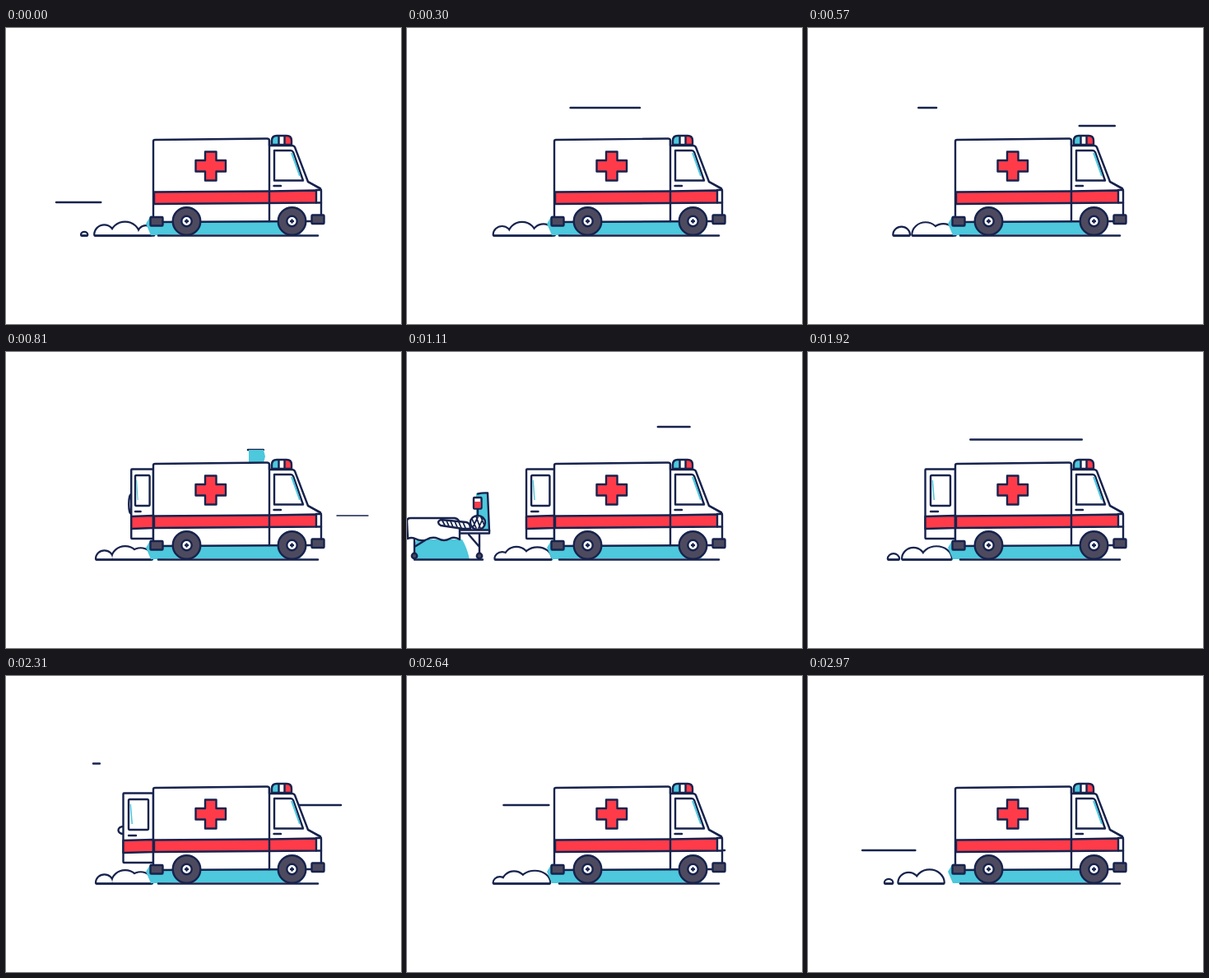
These frames come from a looping animation (480x360 px, 3000 ms). An HTML page:

```html
<!DOCTYPE html>
<html lang="en">
<head>
<meta charset="utf-8">
<title>Ambulance</title>
<style>
  html, body { margin: 0; width: 100%; height: 100%; overflow: hidden; background: #fff; }
  svg { display: block; width: 480px; height: 360px; }
  svg * { vector-effect: non-scaling-stroke; }
  .o { stroke: #17234d; stroke-width: 2.4; stroke-linecap: round; stroke-linejoin: round; }
  .w { fill: #fff; }
  .r { fill: #ff3b4a; }
  .c { fill: #4dc8dc; }
  .g { fill: #4d4a5f; }
  .n { fill: none; }
  .thin { stroke-width: 1.8; }
  .rim { stroke-width: 4.4; }
  #lines { stroke-width: 2.5; }
</style>
</head>
<body>
<svg viewBox="0 0 480 360">
  <defs>
    <clipPath id="behind"><rect width="177" height="360"/></clipPath>
    <g id="wheel">
      <circle class="o g" r="16.800"/>
      <circle class="o w" r="6.2"/>
      <path class="o" d="M-1.5 0H1.5M0-1.5V1.5"/>
    </g>
  </defs>

  <g id="lines" class="o n"></g>

  <g clip-path="url(#behind)">
    <g id="bed">
      <path class="c" d="M12 228H67Q73 238 76 252H13Q4 240 12 228ZM84 172H98L100 218H84Z"/>
      <path class="o n" d="M9 252.5H92M86 172.500Q92 171 98 171.5L100 218M86 191V201"/>
      <path class="o n" d="M9 228V245M88 222V245M75 222 88 237M22 229 9 237"/>
      <circle class="o g" cx="9" cy="248" r="3.2"/>
      <circle class="o g" cx="88" cy="248" r="3.2"/>
      <path class="o w" d="M62 216.500H100V220.500H62Z"/>
      <path class="o w" d="M0 206Q0 202 4 202H58Q64 203 64 210V228Q58 224 52 227 45 231 38 227 31 224 24 228 17 231 10 227 5 225 1 227Z"/>
      <ellipse class="o w" cx="86" cy="207.500" rx="9" ry="8.5"/>
      <path class="o n thin" d="M79 203 84 214M84 200 89 214M90 201 94 211M80 213 86 201M87 214 92 203"/>
      <path class="o w" d="M41 204 72 207Q77 208 77 215H68L41 211Q35 207 41 204Z"/>
      <path class="o n thin" d="M43 205 46 211M48 205 51 212M53 206 56 213M58 206 61 213M63 207 66 214M68 207 71 214"/>
      <rect class="o w" x="81" y="177" width="9.500" height="13.500" rx="1"/>
      <path class="r" d="M82 182H89.5V189.500H82Z"/>
    </g>
  </g>

  <g id="smoke"></g>

  <ellipse id="knob" class="o w"/>
  <g transform="translate(179 0)">
    <g id="door">
      <rect class="o w" x="-36.5" y="142.5" width="36.5" height="84.500" rx="1"/>
      <path class="o r" d="M-36.5 200 0 199V214L-36.5 215Z"/>
      <rect class="o w" x="-30" y="150" width="24" height="37" rx="1.5"/>
      <path class="c" d="M-28.500 156H-27L-25 180H-26.500Z"/>
      <path class="o n" d="M-30 194H-21"/>
    </g>
  </g>

  <path id="vent" class="c" d="M295 119H313L315 127 313 135H295Z"/>
  <path class="c" d="M176 228 170 238 176 252H185L210 251H358V235H190Z"/>
  <path class="o n" d="M185 252.5H379"/>
  <path class="o w" d="M179 138Q179 136 181 136L317 134.5Q320 134.5 320 137V143H347Q350 143 351 145L367 187 381 195Q383 196 383 198V228Q383 235 376 235L179 236Z"/>
  <path class="o r" d="M180 199.5 320 198.5 377 197.5V212.5L180 214Z"/>
  <path class="o n" d="M377 197H383M377 212.5H383M320 137V235M325.500 192H334M367 187 382 195"/>
  <path class="o w" d="M326 149H346Q348 149 349 151L361 185.5H326Z"/>
  <path class="c" d="M346 152H348.500L358 180H356Z"/>
  <path class="o r" d="M242 150.5H255.5V161H267V174.5H255.5V185.5H242V174.5H230.5V161H242Z"/>
  <path class="c" d="M323 142V137Q323 131 329 131H332V142Z"/>
  <path class="w" d="M331 131H340V142H331Z"/>
  <path class="r" d="M339 131H342Q347 131 347 137V142H339Z"/>
  <path class="o n" d="M323 142V137Q323 131 329 131H341Q347 131 347 137V142ZM331.5 131V142M338.5 131V142"/>
  <rect class="o g" x="175.500" y="230" width="15" height="10.500" rx="1"/>
  <rect class="o g" x="371.500" y="227.500" width="15" height="10.500" rx="1"/>
  <use href="#wheel" x="219.500" y="235"/>
  <use href="#wheel" x="347.500" y="235"/>
</svg>
<script>
const LOOP = 3000;
const NS = 'http://www.w3.org/2000/svg';
const $ = id => document.getElementById(id);
const clamp = u => Math.min(1, Math.max(0, u));
const mix = (a, b, u) => a + (b - a) * u;
const easeOut = u => 1 - (1 - clamp(u)) ** 2;

function add(parent, tag, cls) {
  const el = parent.appendChild(document.createElementNS(NS, tag));
  if (cls) el.setAttribute('class', cls);
  return el;
}
function set(el, attrs) {
  for (const k in attrs) el.setAttribute(k, attrs[k]);
}
// Linear interpolation through [position, value] pairs
function track(keys, x) {
  if (x <= keys[0][0]) return keys[0][1];
  for (let i = 1; i < keys.length; i++) {
    const [a, va] = keys[i - 1], [b, vb] = keys[i];
    if (x <= b) return mix(va, vb, (x - a) / (b - a));
  }
  return keys[keys.length - 1][1];
}

// Speed lines: the left end leads, the right end follows after a lag
const streaks = [
  { y: 212, from: 386, to: 56, start: 2484, dur: 590, lag: 177 },
  { y: 97, from: 403, to: 134, start: 0, dur: 590, lag: 150 },
  { y: 119, from: 403, to: 290, start: 331, dur: 590, lag: 155 },
  { y: 199, from: 440, to: 110, start: 776, dur: 590, lag: 175, width: 1.4 },
  { y: 91, from: 420, to: 265, start: 820, dur: 590, lag: 121 },
  { y: 158, from: 448, to: 48, start: 1155, dur: 450, lag: 129 },
  { y: 106.5, from: 450, to: 106, start: 1635, dur: 590, lag: 175 },
  { y: 157, from: 407, to: 110, start: 2220, dur: 500, lag: 150 }
];
for (const s of streaks) {
  s.el = add($('lines'), 'path');
  if (s.width) s.el.style.strokeWidth = s.width;
}
function drawStreaks(t) {
  for (const s of streaks) {
    const age = (t - s.start + LOOP) % LOOP;
    const left = mix(s.from, s.to, easeOut(age / s.dur));
    const right = mix(s.from, s.to, easeOut((age - s.lag) / s.dur));
    s.el.setAttribute('d', right - left > 1 ? `M${left} ${s.y}H${right}` : '');
  }
}

// Exhaust: a puff every 250 ms drifts left, swells, then shrinks
const GROUND = 252.5;
const GAP = 250;
const drift = [-1, 4, 5, -2, -2, -1];
const radius = [[92, 0], [97, 3], [110, 8], [121, 11], [141, 16], [157, 18], [165, 13], [172, 8]];
const height = [[92, 0], [97, 2.5], [110, 7], [121, 11], [141, 14.5], [149, 15], [165, 12], [172, 9.5]];
const edges = add($('smoke'), 'path', 'o w rim');
const puffs = add($('smoke'), 'path', 'w');
const base = add($('smoke'), 'path', 'o n');
function drawSmoke(t) {
  let domes = '', floor = '';
  const newest = Math.floor(t / GAP);
  for (let i = 0; i < 4; i++) {
    const n = newest - i;
    const age = t - n * GAP;
    const x0 = 170 - 0.097 * age;
    const r = track(radius, x0), h = track(height, x0);
    if (r < 1) continue;
    const x = x0 + drift[(n + 6) % 6] * clamp(age / 250);
    const left = x - r, right = Math.min(x + r, 176);
    domes += `M${left} ${GROUND - 1}A${r} ${h} 0 0 1 ${x + r} ${GROUND - 1}Z`;
    floor += `M${left} ${GROUND}H${right}`;
  }
  edges.setAttribute('d', domes);
  puffs.setAttribute('d', domes);
  base.setAttribute('d', floor);
}

const doorOpen = [[690, 0], [810, 0.73], [900, 1], [1020, 1], [1110, 0.93], [1200, 1], [2330, 1], [2560, 0]];
function drawDoor(t) {
  const open = track(doorOpen, t);
  const opening = t > 740 && t < 860, closing = t > 2270 && t < 2390;
  set($('door'), { transform: `scale(${open} 1)`, visibility: open > 0.02 ? 'visible' : 'hidden' });
  set($('knob'), {
    cx: 179 - 36.5 * open, cy: opening ? 185 : 187.5,
    rx: opening ? 3 : 6, ry: opening ? 12 : 4.5,
    visibility: opening || closing ? 'visible' : 'hidden'
  });
}

// The stretcher rolls out of the back and is drawn in again
function drawBed(t) {
  const out = easeOut((t - 843) / 267);
  const back = clamp((t - 1140) / 360) ** 2;
  const x = 180 * (1 - out + back);
  set($('bed'), { transform: `translate(${x} 0)`, visibility: x < 179 ? 'visible' : 'hidden' });
}

function frame(now) {
  const t = now % LOOP;
  drawStreaks(t);
  drawSmoke(t);
  drawDoor(t);
  drawBed(t);
  $('vent').setAttribute('visibility', t > 760 && t < 870 ? 'visible' : 'hidden');
  requestAnimationFrame(frame);
}
frame(performance.now());
</script>
</body>
</html>
```
